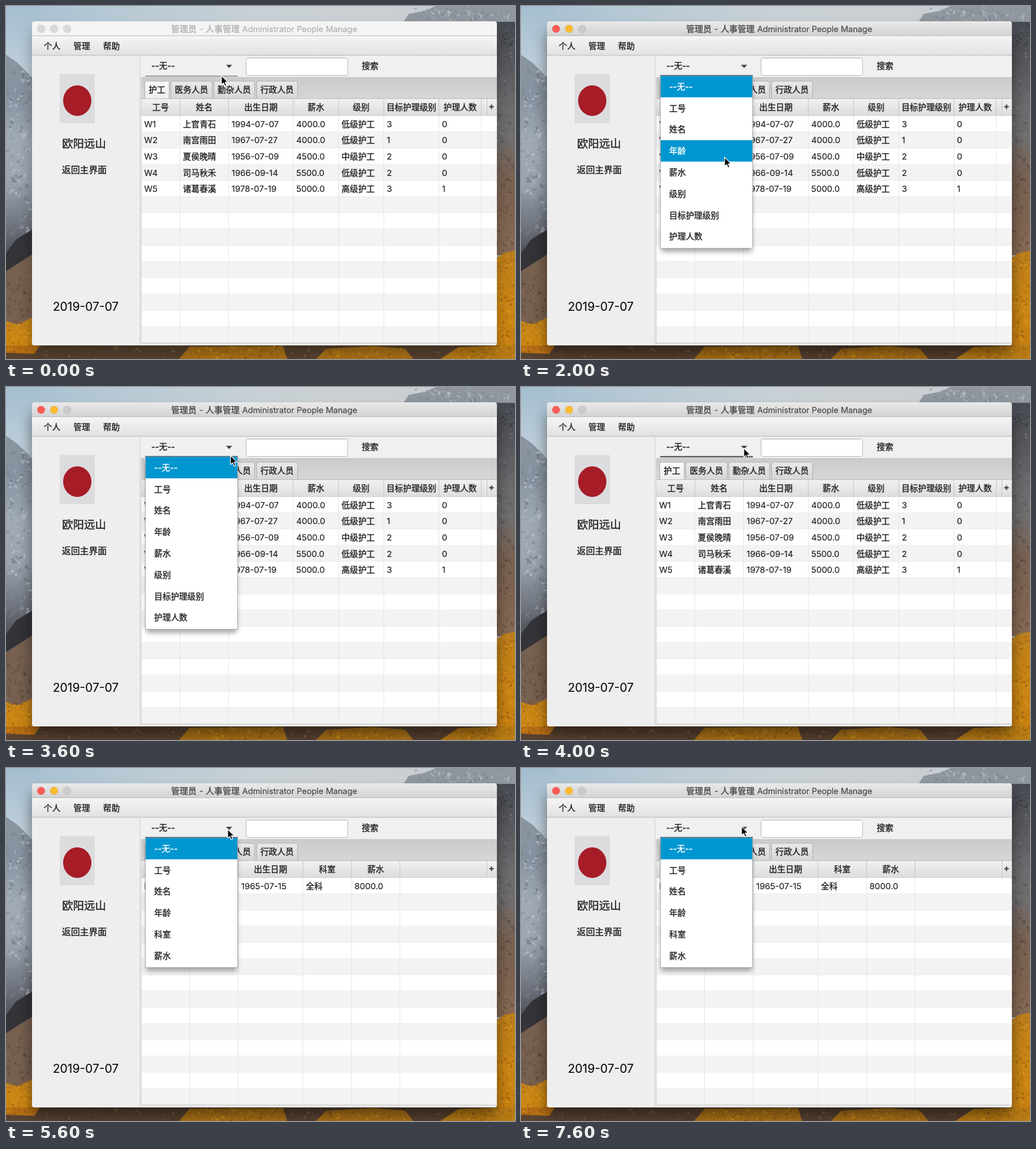
These frames come from a looping animation (900x623 px, 8 s). An HTML page:

```html
<!DOCTYPE html>
<html lang="zh">
<head>
<meta charset="utf-8">
<title>人事管理</title>
<style>
html, body { margin: 0; width: 100%; height: 100%; overflow: hidden; }
svg { display: block; width: 900px; height: 623px; }
text {
  font-family: Inter, "Noto Sans CJK SC", "Noto Sans CJK", sans-serif; white-space: pre;
  fill: currentColor; stroke: currentColor; stroke-width: .2;
}
text.cjk { font-weight: 500; stroke-width: .4; }
</style>
</head>
<body>
<svg id="stage" viewBox="0 0 900 623" xmlns="http://www.w3.org/2000/svg"></svg>
<script>
const STEP = 400, LOOP = 8000;
const LINE = '#e4e4e4', BLUE = '#0096d0', INK = '#222';

let seed = 11;
const rnd = () => (seed = (seed * 16807) % 2147483647) / 2147483647;

const rect = (x, y, w, h, fill, more = '') =>
  `<rect x="${x}" y="${y}" width="${w}" height="${h}" fill="${fill}" ${more}/>`;
const poly = (points, fill) => `<polygon points="${points}" fill="${fill}"/>`;
const group = (id, body, more = '') => `<g id="${id}" ${more}>${body}</g>`;
const fade = (id, stops, across) =>
  `<linearGradient id="${id}" x2="${across ? 1 : 0}" y2="${across ? 0 : 1}">` +
  stops.map((c, i) => `<stop offset="${i / (stops.length - 1)}" stop-color="${c}"/>`).join('') +
  '</linearGradient>';

// cy is the visual middle of the line
function label(x, cy, str, { size, color = INK, mid = false } = {}) {
  const cjk = /[\u4e00-\u9fff]/.test(str);
  const px = size || (cjk ? 14.7 : 15);
  return `<text x="${x}" y="${(cy + px * 0.365).toFixed(1)}" font-size="${px}" color="${color}"` +
    `${cjk ? ' class="cjk"' : ''}${mid ? ' text-anchor="middle"' : ''}>${str}</text>`;
}

// random slivers that give rock and leaves a soft grain
function scatter(n, x, y, w, h, size, colors) {
  let out = '';
  for (let i = 0; i < n; i++) {
    const px = x + rnd() * w, py = y + rnd() * h;
    const corner = () => `${(px + (rnd() - 0.5) * size).toFixed(1)},${(py + (rnd() - 0.5) * size).toFixed(1)}`;
    out += poly(`${corner()} ${corner()} ${corner()}`, colors[Math.floor(rnd() * colors.length)]);
  }
  return `<g opacity=".55">${out}</g>`;
}

function landscape() {
  const snow = ['#b9c2cd', '#78828e', '#98a3b0', '#cbd2da', '#67717d'];
  const rock = ['#5c5d61', '#7d7d81', '#525257', '#8a8685'];
  const earth = ['#6d5546', '#8c705b', '#58463a', '#7c6353', '#453830'];
  const leaf = ['#e09a12', '#c9780c', '#a2570f', '#e8ac28', '#7b4514'];
  return rect(0, 0, 900, 623, 'url(#sky)') + rect(0, 0, 60, 200, 'url(#haze)') +
    poly('0,86 20,100 50,130 50,460 0,460', 'url(#slope)') +
    scatter(150, 0, 115, 46, 290, 13, snow) +
    poly('0,436 18,412 50,392 50,470 0,470', '#343338') +
    poly('0,468 50,436 50,600 0,600', '#76604f') +
    scatter(110, 0, 472, 46, 84, 10, earth) +
    poly('0,556 20,562 50,548 50,623 0,623', 'url(#grove)') +
    poly('703,28 712,14 742,8 760,0 900,0 900,50 703,50', '#8f969e') +
    scatter(110, 725, 4, 175, 24, 11, snow) +
    rect(866, 28, 34, 412, 'url(#cliff)') +
    scatter(50, 868, 32, 32, 42, 9, ['#2d2f34', '#60636a', '#3a3d43']) +
    scatter(110, 868, 80, 32, 165, 10, rock) +
    scatter(130, 868, 250, 32, 180, 10, earth) +
    poly('864,448 880,436 900,432 900,623 864,623', 'url(#grove)') +
    rect(0, 599, 900, 24, '#584230') +
    scatter(230, 0, 600, 900, 22, 9, earth) +
    poly('0,599 60,599 50,614 0,612', '#b46d14') +
    poly('306,623 325,601 490,600 497,623', '#ab7217') +
    poly('548,623 566,605 650,600 706,605 720,623', '#ab7219') +
    poly('768,623 800,602 900,598 900,623', '#b87c15') +
    scatter(100, 0, 558, 46, 54, 8, leaf) +
    scatter(270, 868, 442, 32, 180, 8, leaf) +
    scatter(150, 314, 602, 175, 20, 8, leaf) +
    scatter(110, 565, 605, 140, 17, 8, leaf) +
    scatter(80, 795, 605, 75, 17, 8, leaf);
}

function titleBar() {
  const light = (x, id) => `<circle id="${id}" cx="${x}" cy="40.3" r="6.8" stroke="#0002" stroke-width=".7"/>`;
  const part = (x, s, size) => label(x, 40.5, s, { size, color: 'inherit' });
  return rect(46, 27, 822, 26, '#f4f4f4', 'id="bar"') + rect(46, 52, 822, 1, '#b9b9b9') +
    light(62, 'red') + light(85, 'yellow') + light(108, 'grey') +
    group('caption', part(292, '管理员', 15) + part(342, '-', 14.5) +
      part(353, '人事管理', 15) + part(417.7, 'Administrator People Manage', 14.55));
}

function frame() {
  const menu = [[81.5, '个人'], [134, '管理'], [186.5, '帮助']]
    .map(([x, s]) => label(x, 71, s, { mid: true })).join('');
  return rect(46, 53, 822, 34, 'url(#menu)') + rect(46, 86.5, 822, 1, '#b6b6b6') + menu +
    rect(95, 120, 62, 87, '#dcdcdf') +
    '<ellipse cx="126" cy="167" rx="25" ry="27" fill="#a61c27"/>' +
    label(138, 243, '欧阳远山', { size: 19.4, mid: true }) +
    label(138.5, 289, '返回主界面', { size: 15.9, mid: true }) +
    label(141, 530.5, '2019-07-07', { size: 21, color: '#111', mid: true }) +
    rect(236.6, 87, 1, 512, '#bcbcbc') + rect(237.6, 87, 1, 512, '#fafafa');
}

function toolbar() {
  return rect(238.6, 88, 629.4, 38, '#f0f0f0') +
    label(257, 106, '--无--') + poly('389,103.8 400,103.8 394.5,109.6', '#444') +
    rect(246, 123.2, 164, 1.1, '#555', 'id="thin"') + rect(246, 121.8, 164, 1.8, '#4d5560', 'id="thick"') +
    rect(424.5, 91.5, 179.5, 31, '#fff', 'rx="3.5" stroke="#b5b5b5"') +
    rect(426, 92.2, 176.5, 1.3, '#ececec') +
    label(643.8, 106, '搜索', { mid: true });
}

function tabs() {
  const list = [[245, 44, '护工'], [291, 74, '医务人员'], [367, 73, '勤杂人员'], [442.6, 73.4, '行政人员']];
  return rect(238.6, 126, 629.4, 37.5, 'url(#strip)') + rect(238.6, 125.6, 629.4, 1, '#c2c2c2') +
    list.map(([x, w, s], i) =>
      `<path id="tab${i}" d="M${x + .5} 163.5V136q0-3.2 3.2-3.2h${w - 7.4}q3.2 0 3.2 3.2V163.5"/>` +
      label(x + w / 2, 148, s, { mid: true })).join('') +
    rect(238.6, 163, 629.4, 1, '#b9b9b9');
}

const ROW = 28.63, TOP = 193.8;

function table(id, edges, heads, rows) {
  let out = rect(239, 164, 629, 30, 'url(#head)') + rect(239, 193, 629, 1, '#c6c6c6');
  for (let i = 0; i < 14; i++) {
    const y = TOP + i * ROW;
    out += rect(239, y, 629, ROW, i % 2 ? '#f3f3f3' : '#fff') + rect(239, y + ROW - 1, 629, 1, '#eaeaea');
  }
  edges.slice(1).forEach(x => {
    out += rect(x - .5, 164, 1, 29.5, '#c4c4c4') + rect(x - .5, TOP, 1, ROW * 14, LINE);
  });
  heads.forEach((s, i) => { out += label((edges[i] + edges[i + 1]) / 2, 179, s, { mid: true }); });
  rows.forEach((cells, r) => cells.forEach((s, c) => {
    out += label(edges[c] + 5.3, 208.3 + r * ROW, s);
  }));
  out += rect(850, 164, 1, 29.5, '#c4c4c4') + rect(854.5, 176.7, 8, 2.2, '#444') + rect(857.4, 173.8, 2.2, 8, '#444') +
    rect(238.6, 164, 1, 431, '#c8c8c8') + rect(239, 594.5, 629, 1, '#c3c3c3');
  return group(id, out);
}

const ITEM = 37.8, LIST_TOP = 123.4;

function popup(id, items) {
  const h = items.length * ITEM + 1.8;
  const body = rect(248, LIST_TOP, 160, h, '#000', 'opacity=".36" filter="url(#soft)" transform="translate(0 6)"') +
    rect(246.5, LIST_TOP, 163, h, '#fff', 'stroke="#a3a5ad" stroke-width=".9"') +
    items.map((s, i) =>
      rect(247, LIST_TOP + i * ITEM, 162, ITEM, BLUE, `id="${id}bg${i}"`) +
      group(`${id}tx${i}`, label(262, 142.4 + i * ITEM, s, { color: 'inherit' }))).join('');
  return group(id, body);
}

const lists = [
  ['--无--', '工号', '姓名', '年龄', '薪水', '级别', '目标护理级别', '护理人数'],
  ['--无--', '工号', '姓名', '年龄', '科室', '薪水']
];

const svg = document.getElementById('stage');
svg.innerHTML = '<defs>' +
  fade('sky', ['#a6bfd0', '#b9cad5', '#c8d0d5', '#cbcfd2', '#bcc6cd'], true) +
  fade('haze', ['#a4bdce', '#bccdd9', '#cdd7de']) +
  fade('slope', ['#8a95a1', '#8792a0', '#a0aab6', '#9ba4b0', '#70757f', '#3f4046']) +
  fade('cliff', ['#484b52', '#56575c', '#6a696c', '#716e6e', '#786253', '#806552', '#866a54']) +
  fade('grove', ['#bd7f1d', '#cc8814', '#c98011']) +
  fade('live', ['#e9e9e9', '#d2d2d2']) +
  fade('menu', ['#f5f5f5', '#e1e1e1']) +
  fade('strip', ['#cbcbcb', '#d6d6d6']) +
  fade('head', ['#f1f1f1', '#dcdcdc']) +
  fade('idle', ['#e9e9e9', '#d6d6d6']) +
  fade('picked', ['#fafafa', '#eeeeee']) +
  '<clipPath id="win"><path d="M51 27H863q5 0 5 5V595q0 4-4 4H50q-4 0-4-4V32q0-5 5-5"/></clipPath>' +
  '<filter id="soft" x="-20%" y="-20%" width="140%" height="140%"><feGaussianBlur stdDeviation="5"/></filter>' +
  '<filter id="wide" x="-10%" y="-10%" width="120%" height="120%"><feGaussianBlur stdDeviation="13"/></filter>' +
  '</defs>' + landscape() +
  rect(46, 46, 822, 566, '#000', 'id="shade" filter="url(#wide)"') +
  group('window',
    rect(46, 27, 822, 572, '#eeeeee') + titleBar() + frame() + toolbar() + tabs() +
    table('table0', [239, 307.5, 393.5, 508, 588, 668, 765.5, 840.5],
      ['工号', '姓名', '出生日期', '薪水', '级别', '目标护理级别', '护理人数'],
      [['W1', '上官青石', '1994-07-07', '4000.0', '低级护工', '3', '0'],
       ['W2', '南宫雨田', '1967-07-27', '4000.0', '低级护工', '1', '0'],
       ['W3', '夏侯晚晴', '1956-07-09', '4500.0', '中级护工', '2', '0'],
       ['W4', '司马秋禾', '1966-09-14', '5500.0', '低级护工', '2', '0'],
       ['W5', '诸葛春溪', '1978-07-19', '5000.0', '高级护工', '3', '1']]) +
    table('table1', [239, 324.5, 410.5, 525, 611, 696.5],
      ['工号', '姓名', '出生日期', '科室', '薪水'],
      [['D1', '乔予安', '1965-07-15', '全科', '8000.0']]),
    'clip-path="url(#win)"') +
  lists.map((items, i) => popup('list' + i, items)).join('') +
  '<path id="cursor" d="M0 0V16L3.7 12.6 6.3 18.6 9 17.4 6.4 11.6H11.4Z" fill="#000" stroke="#fff" stroke-width="1.2" stroke-linejoin="round"/>';

const el = {};
svg.querySelectorAll('[id]').forEach(n => { el[n.id] = n; });
const set = (id, attrs) => { for (const k in attrs) el[id].setAttribute(k, attrs[k]); };
const show = (id, on) => set(id, { display: on ? 'inline' : 'none' });

// pointer x, y and the hovered item, one entry per step
const path = [
  [381, 123], [389, 112], [394, 106], [396, 112], [407, 181, 1],
  [360, 267, 3], [354, 337, 5], [352, 386, 6], [358, 298, 4], [397, 121],
  [394, 108], [362, 128], [335, 152], [364, 130], [392, 108],
  [374, 182, 1], [352, 262, 3], [348, 331, 5], [394, 117], [390, 103]
];

function draw(time) {
  const step = Math.floor((time % LOOP) / STEP);
  const [x, y, hover = 0] = path[step];
  const live = step >= 2, page = step >= 12 ? 1 : 0;
  const open = (step >= 2 && step < 10) || step >= 14;
  const tabFocus = step === 12 || step === 13;

  set('bar', { fill: live ? 'url(#live)' : '#f4f4f4' });
  set('caption', { color: live ? '#484848' : '#b0b0b0' });
  set('red', { fill: live ? '#fc5b56' : '#d9d9d9' });
  set('yellow', { fill: live ? '#fdbb2d' : '#d9d9d9' });
  set('grey', { fill: live ? '#cbcbcb' : '#d9d9d9' });
  set('shade', { opacity: live ? 0.48 : 0.3 });

  for (let i = 0; i < 4; i++) {
    const on = i === page;
    set('tab' + i, {
      fill: on ? 'url(#picked)' : 'url(#idle)',
      stroke: on && tabFocus ? '#079ad1' : '#aeaeae',
      'stroke-width': on && tabFocus ? 1.6 : 1
    });
  }
  for (let i = 0; i < 2; i++) {
    show('table' + i, i === page);
    show('list' + i, open && i === page);
    lists[i].forEach((_, k) => {
      const lit = k === 0 || k === hover;
      show(`list${i}bg${k}`, lit);
      set(`list${i}tx${k}`, { color: lit ? '#fff' : INK });
    });
  }
  const growing = step === 2;
  show('thin', !growing);
  show('thick', live && !tabFocus);
  set('thick', { x: growing ? 292 : 246, width: growing ? 72 : 164 });
  set('cursor', { transform: `translate(${x} ${y})` });
}

function tick() {
  draw(performance.now());
  requestAnimationFrame(tick);
}
tick();
</script>
</body>
</html>
```
